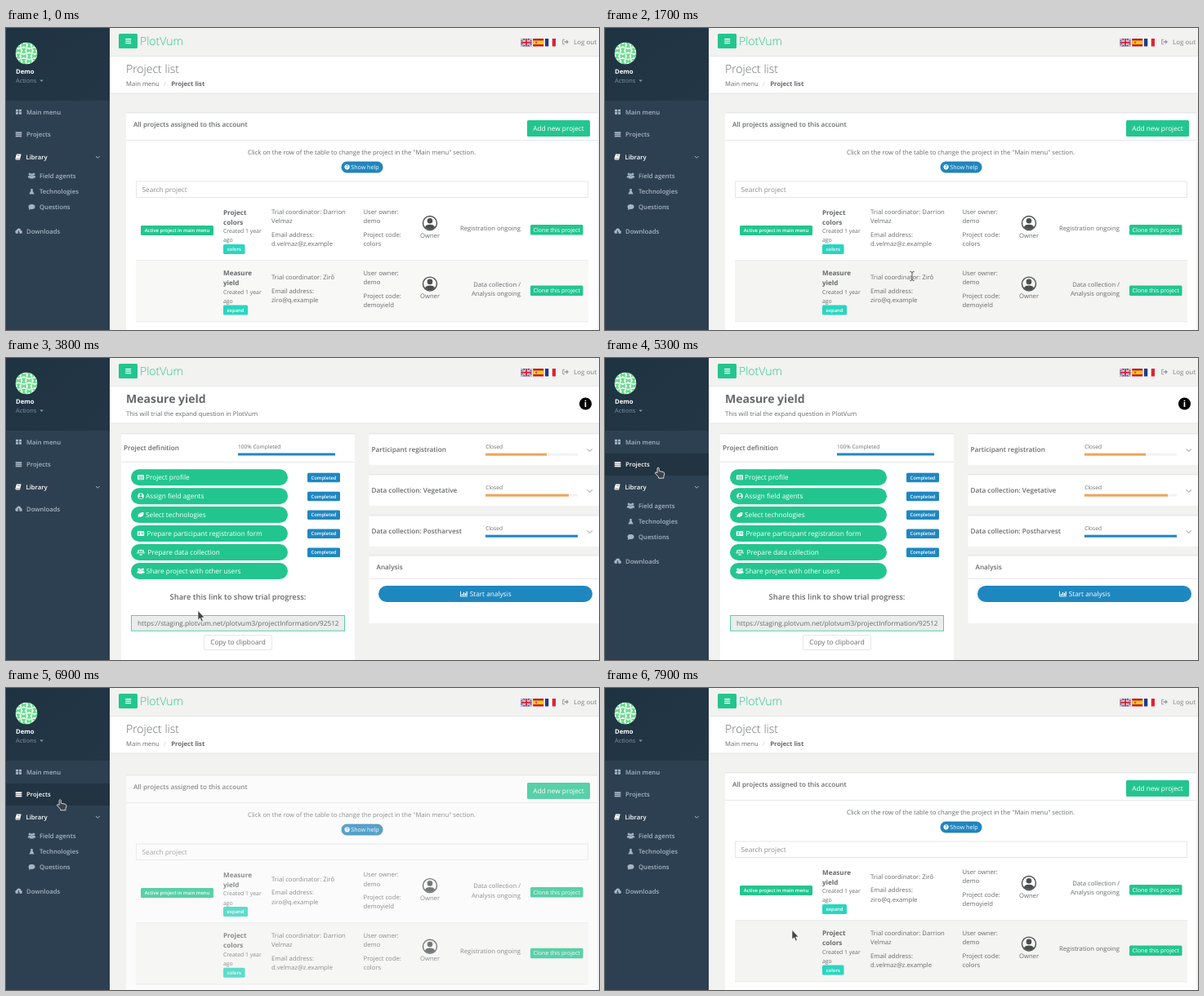
Animation, 726 px wide and 370 px high, one loop 8000 ms. Source, as an HTML page:

```html
<!DOCTYPE html>
<html lang="en">
<head>
<meta charset="utf-8">
<style>
html, body { margin: 0; width: 100%; height: 100%; overflow: hidden; background: #f2f2f1; }
svg { display: block; width: 726px; height: 370px; font-family: "Open Sans", sans-serif; text-rendering: geometricPrecision; }
text { white-space: pre; }
</style>
</head>
<body>
<svg id="stage" viewBox="0 0 726 370"></svg>
<script>
const GREEN = '#23c58f', BLUE = '#1f87c0', GREY = '#676a6c', LINE = '#e5e7e6', MENU = '#a7b4c3';
const ANCHOR = { l: 'start', m: 'middle', r: 'end' };

// y is the vertical middle of the capitals
const text = (x, y, s, { size = 7.7, w = 400, c = GREY, a = 'l' } = {}) =>
  `<text x="${x}" y="${y + size * .36}" font-size="${size}" font-weight="${w}" fill="${c}" text-anchor="${ANCHOR[a]}">${s}</text>`;
const rect = (x, y, x2, y2, fill, r = 0, extra = '') =>
  `<rect x="${x}" y="${y}" width="${x2 - x}" height="${y2 - y}" rx="${r}" fill="${fill}" ${extra}/>`;
const path = (d, fill, extra = '') => `<path d="${d}" fill="${fill}" ${extra}/>`;
const line = (d, stroke, w = 1) => path(d, 'none', `stroke="${stroke}" stroke-width="${w}"`);
const circle = (x, y, r, fill, extra = '') => `<circle cx="${x}" cy="${y}" r="${r}" fill="${fill}" ${extra}/>`;
const group = (id, body, extra = '') => `<g id="${id}" ${extra}>${body}</g>`;
const at = (x, y, body) => `<g transform="translate(${x} ${y})">${body}</g>`;
const badge = (x, y, x2, y2, fill, s, size = 5.9, w = 600) =>
  rect(x, y, x2, y2, fill, 1.5) + text((x + x2) / 2, (y + y2) / 2, s, { size, w, c: '#fff', a: 'm' });
const panel = (x, y, x2, y2) => rect(x, y, x2, y2, '#fff') + rect(x, y - 1, x2, y + .4, LINE);

// Icons are drawn around their centre
const person = (x, y, c) => at(x, y, circle(0, -1.6, 1.5, c) + path('M-2.3 3Q-2.4 .2 0 .2T2.3 3Z', c));
const icon = {
  users: c => person(-2.4, -.4, c) + person(2.4, -.4, c) + person(0, .4, c),
  grid: c => rect(-3.5, -3, -.4, -.3, c) + rect(.4, -3, 3.5, -.3, c) + rect(-3.5, .3, -.4, 3, c) + rect(.4, .3, 3.5, 3, c),
  bars: c => [-3, -.8, 1.4].map(y => rect(-3.8, y, 3.8, y + 1.7, c)).join(''),
  book: c => path('M-2-3.4H3.6L2 3.4H-2.8Q-4 3-3.4 1Z', c) + line('M-2.6 2H1.6M-.8-1.6H1.8', '#2f4152', .6),
  flask: c => path('M-1.2-3.4H1.2V-.6L3.2 3.2H-3.2L-1.2-.6Z', c),
  comment: c => `<ellipse cy="-.3" rx="4" ry="2.9" fill="${c}"/>` + path('M-3 1L-3.4 3.6 0 2Z', c),
  cloud: c => circle(-2, .8, 2.2, c) + circle(.2, -.8, 2.6, c) + circle(2.4, .9, 2, c) + line('M0-1V2.2M-1.2 1L0 2.2 1.2 1', '#2f4152', .8),
  list: c => rect(-4, -3, 4, 3, c, .8) + line('M-3-.8H3M-3 .6H3M-3 1.9H3', GREEN, .7),
  user: c => circle(0, 0, 3.7, c) + person(0, .2, GREEN),
  leaf: c => path('M-3.4 3Q-4.4-2.6 3.4-3.2 4 3.4-1.8 2.4Z', c),
  card: c => rect(-4.2, -3, 4.2, 3, c, .8) + line('M.6-1H3.2M.6 .6H3.2M-3 1.2H-.6', GREEN, .8) + circle(-1.8, -.6, 1, GREEN),
  scale: c => line('M0-3.4V3.2M-2 3.2H2M-3.5-2.4H3.5M-4.4 1L-3-2 -1.6 1ZM1.6 1L3-2 4.4 1Z', c, .8),
  chart: c => line('M-4-3.2V3H4.4', c, .9) + line('M-2 2V0M0 2V-2M2 2V-1M3.7 2V-3', c, 1.2)
};
const put = (name, x, y, c = '#fff') => at(x, y, icon[name](c));

function sidebar() {
  const item = (name, x, y, s, c = MENU, gap = 9.5) => put(name, x, y, c) + text(x + gap, y, s, { w: 600, c });
  let avatar = circle(25, 31, 13.5, '#f1fff5');
  for (let i = 0; i < 4; i++) for (let j = 0; j < 4; j++) {
    const x = 15 + i * 6.7, y = 21 + j * 6.7;
    avatar += path(`M${x - 3} ${y - 3}h6l-2 3 2 3h-6l2-3z`, '#66db8b', (i + j) % 2 ? `transform="rotate(90 ${x} ${y})"` : '');
  }
  return rect(0, 0, 127, 370, '#2d4051') + rect(0, 0, 127, 89, 'url(#shade)') +
    `<g clip-path="url(#round)">${avatar}</g>` +
    text(12, 53, 'Demo', { w: 700, c: '#fff' }) + text(12, 64.5, 'Actions', { size: 7.4, c: '#8496a6' }) +
    path('M41.3 63.5h4.6l-2.3 2.6z', '#8496a6') +
    item('grid', 15.5, 102.8, 'Main menu') +
    group('idle', item('bars', 15.5, 130.3, 'Projects')) +
    group('hover', rect(0, 117, 127, 144, '#223342') + item('bars', 15.5, 130.3, 'Projects', '#fff')) +
    item('book', 15, 158, 'Library', '#fff') + line('M110 157l2.3 2.3 2.3-2.3', MENU, 1) +
    group('submenu', item('users', 31.5, 181, 'Field agents') + item('flask', 31.5, 200.3, 'Technologies') +
      item('comment', 31.5, 219.3, 'Questions'), 'clip-path="url(#fold)"') +
    group('downloads', item('cloud', 15.5, 0, 'Downloads'));
}

function navbar() {
  const uk = rect(0, 0, 13, 9.5, '#27408b') + line('M0 0L13 9.5M13 0L0 9.5', '#fff', 2) + line('M0 0L13 9.5M13 0L0 9.5', '#cf2039', .7) +
    line('M6.5 0V9.5M0 4.75H13', '#fff', 3.2) + line('M6.5 0V9.5M0 4.75H13', '#cf2039', 1.8);
  const spain = rect(0, 0, 13, 9.5, '#c8152c') + rect(0, 2.4, 13, 7.1, '#ffc814') + rect(3, 3.6, 5, 6, '#b5602c');
  const france = rect(0, 0, 13, 9.5, '#fff') + rect(0, 0, 4.3, 9.5, '#20398c') + rect(8.7, 0, 13, 9.5, '#dc2438');
  return rect(127, 34, 726, 35, LINE) + rect(127, 35, 726, 80, '#fff') + rect(127, 79.5, 726, 80.5, LINE) +
    rect(138, 7, 161, 25, GREEN, 1.5) + line('M146.2 13.7h7M146.2 16.2h7M146.2 18.7h7', '#fff', 1.3) +
    text(164, 15.8, 'PlotVum', { size: 14, w: 300, c: GREEN }) +
    at(630.5, 13, uk) + at(645.2, 13, spain) + at(660, 13, france) +
    line('M684 14.2h-2.3v5.6h2.3', '#999c9e', 1) + path('M683.5 16.2h2.5v-2l3 2.8-3 2.8v-2h-2.5z', '#999c9e') +
    text(695, 17, 'Log out', { size: 7.9, w: 600, c: '#999c9e' });
}

const projects = {
  colors: { title: ['Project', 'colors'], tag: 'colors', tagEnd: 292.5, code: 'colors', y: 225.3,
    who: ['Darrion', 'Velmaz'], mail: 'd.velmaz@z.example', status: ['Registration ongoing'] },
  measure: { title: ['Measure', 'yield'], tag: 'expand', tagEnd: 296, code: 'demoyield', y: 231,
    who: ['Zirô'], mail: 'ziro@q.example', status: ['Data collection /', 'Analysis ongoing'] }
};

function row(p, active) {
  const lines = (x, y, list, style, step = 11.4) => list.map((s, i) => text(x, y + i * step, s, style)).join('');
  const mailY = p.y + p.who.length * 11.4 + 5.2;
  return (active ? badge(165, 242, 254, 254, GREEN, 'Active project in main menu') : '') +
    lines(266, 225.8, p.title, { size: 8.1, w: 700 }, 11.8) +
    lines(266, 248.6, ['Created 1 year', 'ago'], { size: 6.9 }) +
    badge(266, 265, p.tagEnd, 277, '#2ad5c0', p.tag) +
    lines(325, p.y, ['Trial coordinator: ' + p.who[0], ...p.who.slice(1)]) +
    lines(325, mailY, ['Email address:', p.mail]) +
    lines(437.5, 225.3, ['User owner:', 'demo']) + lines(437.5, 253.2, ['Project code:', p.code]) +
    circle(519, 239, 8.5, 'none', 'stroke="#4c4f50" stroke-width="1.4"') + circle(519, 236.3, 3.3, '#4c4f50') +
    path('M512.8 244.2Q514 240.8 519 240.8T525.2 244.2Q519 249.8 512.8 244.2Z', '#4c4f50') +
    text(519, 254, 'Owner', { a: 'm' }) +
    lines(630, p.status[1] ? 239.3 : 245, p.status, { a: 'r' }) +
    badge(642, 241, 706.5, 253.5, GREEN, 'Clone this project', 7.05, 400);
}

const listHead = () =>
  text(147, 49.5, 'Project list', { size: 14, w: 300 }) + text(147, 68.7, 'Main menu') +
  text(193, 68.7, '/', { c: '#ccc' }) + text(202.3, 68.7, 'Project list', { w: 700 });

const listBody = () =>
  panel(147, 104, 724, 370) + rect(147, 137, 724, 138, LINE) +
  text(156, 117.8, 'All projects assigned to this account', { size: 8.1, w: 600 }) +
  badge(638, 113, 715, 133, GREEN, 'Add new project', 8.25, 400) +
  text(435.5, 152.5, 'Click on the row of the table to change the project in the "Main menu" section.', { a: 'm' }) +
  rect(411, 164, 461, 177, BLUE, 6, 'stroke="#1b6fa4" stroke-width=".8"') + circle(417.6, 170.3, 3.1, '#fff') +
  text(417.6, 170.3, '?', { size: 5.5, w: 700, c: BLUE, a: 'm' }) + text(422.3, 170.3, 'Show help', { size: 7.1, c: '#fff' }) +
  rect(159.5, 188, 712.5, 207.5, '#fff', 0, `stroke="${LINE}"`) + text(166.5, 198, 'Search project', { size: 8.3, c: '#8a8c8d' }) +
  `<rect id="row2" x="159" y="285" width="554" height="75"/>` +
  rect(159, 284.3, 713, 285.1, LINE) + rect(159, 359.5, 713, 360.3, LINE) +
  group('colorsFirst', row(projects.colors, true) + at(0, 74.6, row(projects.measure))) +
  group('measureFirst', row(projects.measure, true) + at(0, 74.6, row(projects.colors)));

function projectPage() {
  const steps = [['list', 'Project profile'], ['user', 'Assign field agents'], ['leaf', 'Select technologies'],
    ['card', 'Prepare participant registration form', 172.5], ['scale', 'Prepare data collection', 173.5], ['users', 'Share project with other users', 171.7]];
  const stages = [['Participant registration', 662, '#eea65a'], ['Data collection: Vegetative', 689, '#eea65a'], ['Data collection: Postharvest', 700, BLUE]];
  return text(147, 49.5, 'Measure yield', { size: 14, w: 700 }) +
    text(147, 68.7, 'This will trial the expand question in PlotVum') +
    circle(709.5, 56, 7.6, '#000') + text(709.5, 56, 'i', { size: 11, w: 700, c: '#fff', a: 'm' }) +
    panel(141, 93, 427, 370) + rect(141, 127, 427, 128, LINE) +
    text(144, 110.3, 'Project definition', { size: 8.2, w: 600 }) +
    text(284, 109, '100% Completed', { size: 6.6 }) + rect(284, 116.5, 403, 119.5, BLUE) +
    steps.map(([name, label, x = 171], i) => {
      const y = 146.2 + i * 22.95;
      return rect(153, y - 10, 345, y + 10, GREEN, 10) + put(name, 165, y) + text(x, y, label, { size: 8.25, c: '#fff' }) +
        (i < 5 ? badge(369, y - 5.5, 409, y + 6, BLUE, 'Completed') : '');
    }).join('') +
    text(284, 293, 'Share this link to show trial progress:', { size: 9.4, w: 600, a: 'm' }) +
    rect(153.5, 315.5, 414.5, 334.3, '#ebedec', 0, 'stroke="#58cfaa"') +
    `<g clip-path="url(#field)">${text(161, 325, 'https://staging.plotvum.net/plotvum3/projectInformation/92512', { size: 8.25 })}</g>` +
    rect(242.5, 339.5, 325.5, 357.5, '#fff', 1.5, `stroke="${LINE}"`) + text(284, 348.3, 'Copy to clipboard', { size: 8.25, a: 'm' }) +
    stages.map(([label, end, color], i) => at(0, i * 50,
      panel(444.5, 93, 726, 131) + text(447.5, 112, label, { size: 8.2, w: 600 }) + text(587.3, 109, 'Closed', { size: 6.6 }) +
      rect(587, 116.7, 700, 119.7, '#f2f2f2') + rect(587, 116.7, end, 119.7, color) +
      line('M711.5 111.3l3.2 3.2 3.2-3.2', '#b5b7b8', 1.1))).join('') +
    panel(444.5, 242, 726, 325) + rect(444.5, 270, 726, 271, LINE) + text(453.5, 256.5, 'Analysis', { size: 8.2, w: 600 }) +
    rect(456, 279, 718, 299, BLUE, 10) + put('chart', 560.5, 289) + text(567.7, 289, 'Start analysis', { size: 8.25, c: '#fff' });
}

const cursors =
  group('arrow', path('M0 0V11.5L2.6 9.3 4.4 13.3 6.3 12.5 4.5 8.5H8Z', '#444', 'stroke="#fff" stroke-width=".6"')) +
  group('beam', line('M-2.6-5.6Q0-5.6 0-4V4Q0 5.6-2.6 5.6M2.6-5.6Q0-5.6 0-4M0 4Q0 5.6 2.6 5.6', '#555', 1)) +
  group('hand', path('M-1 1Q0-1 1.2 1V4.6L6 5.6Q8 6 7.8 8L6.8 11.5V13.2H.6V11.8L-3.6 7.4Q-3.6 5.4-1.8 6.2L-1 7Z', '#39434c', 'stroke="#e4e6e7" stroke-width=".9"'));

const stage = document.getElementById('stage');
stage.innerHTML = `<defs>
  <linearGradient id="shade" x2="1" y2="1"><stop stop-color="#1e3341"/><stop offset="1" stop-color="#243646"/></linearGradient>
  <clipPath id="round"><circle cx="25" cy="31" r="13.5"/></clipPath>
  <clipPath id="field"><rect x="155" y="316" width="253" height="18"/></clipPath>
  <clipPath id="fold"><rect id="foldBox" y="171" width="127"/></clipPath></defs>` +
  rect(0, 0, 726, 370, '#f2f2f1') + navbar() +
  group('list', listHead() + group('listBody', listBody())) + group('project', projectPage()) +
  sidebar() + group('cursor', cursors);

const $ = id => document.getElementById(id);
const show = (id, on) => $(id).setAttribute('display', on ? 'inline' : 'none');
const clamp = v => Math.max(0, Math.min(1, v));
const smooth = v => v * v * (3 - 2 * v);

// CSS "ease": cubic-bezier(.25, .1, .25, 1)
function ease(x) {
  let lo = 0, hi = 1, u = .5;
  for (let i = 0; i < 20; i++) {
    u = (lo + hi) / 2;
    if (.75 * u * (1 - u) + u ** 3 < x) lo = u; else hi = u;
  }
  return .3 * u * (1 - u) ** 2 + 3 * u * u * (1 - u) + u ** 3;
}

// time, x, y of the pointer tip
const track = [[700, 420, 334], [1500, 376, 304], [1700, 376, 304], [2400, 235, 309.5], [4400, 235, 309.5],
  [5250, 65, 134], [6600, 65, 134], [7150, 67, 138.5], [7400, 67, 138.5], [7900, 229, 296.5], [8000, 229, 296.5]];
function pointer(t) {
  const i = Math.max(1, track.findIndex(k => k[0] >= t));
  const [t0, x0, y0] = track[i - 1], [t1, x1, y1] = track[i];
  const p = smooth(clamp((t - t0) / (t1 - t0)));
  return [x0 + (x1 - x0) * p, y0 + (y1 - y0) * p];
}

function draw(t) {
  const onProject = t >= 3800 && t < 6580, swapped = t >= 3800;
  show('project', onProject);
  show('list', !onProject);
  show('colorsFirst', !swapped);
  show('measureFirst', swapped);

  const fade = swapped ? ease(clamp((t - 6500) / 900)) : 1;
  $('listBody').setAttribute('opacity', fade);
  $('listBody').setAttribute('transform', `translate(0 ${12 * (1 - fade)})`);

  const open = swapped ? smooth(clamp((t - 3800) / 300)) : 1;
  $('foldBox').setAttribute('height', 64 * open);
  $('downloads').setAttribute('transform', `translate(0 ${185 + 64 * open})`);

  const [x, y] = pointer(t), visible = t >= 700;
  const inMenu = x < 127 && y > 89 && y < 235, inRow = visible && x > 159 && y > 285 && y < 360;
  const inText = !onProject && inRow && x > 325 && x < 425;
  show('cursor', visible);
  $('cursor').setAttribute('transform', `translate(${x} ${y})`);
  show('hand', inMenu);
  show('beam', inText);
  show('arrow', !inMenu && !inText);
  const hover = inMenu && y > 117 && y < 144;
  show('hover', hover);
  show('idle', !hover);
  $('row2').setAttribute('fill', inRow ? '#f4f4f2' : '#f8f8f7');
}

const start = performance.now();
(function frame() {
  draw((performance.now() - start) % 8000);
  requestAnimationFrame(frame);
})();
</script>
</body>
</html>
```
